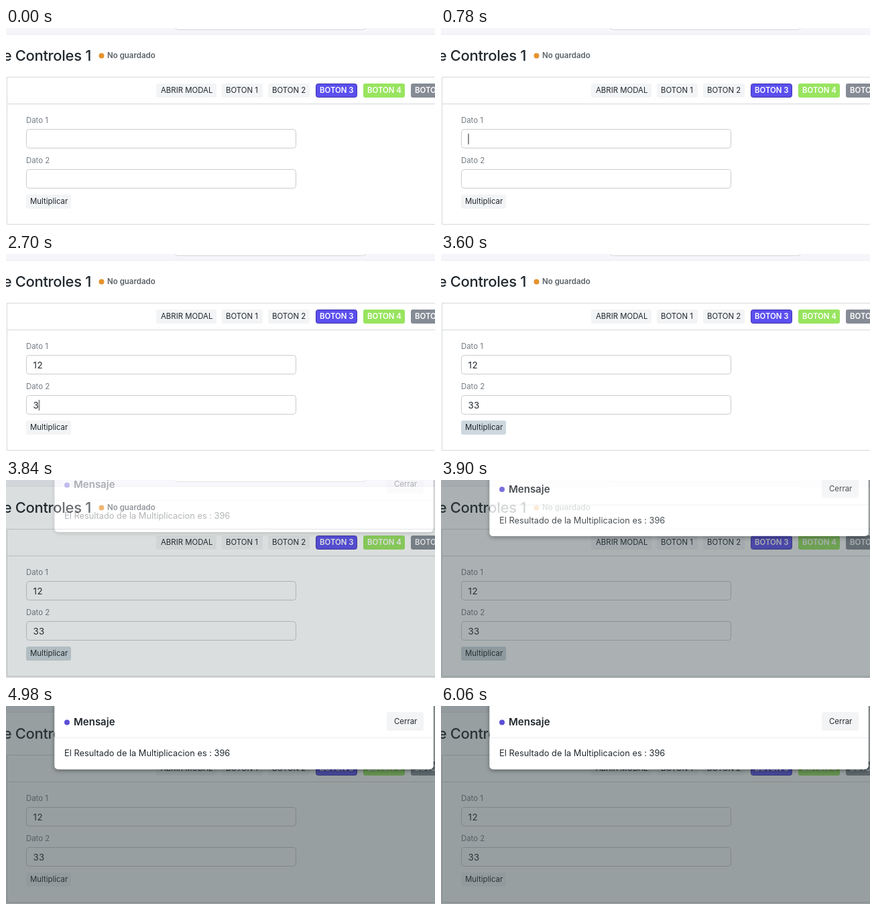
An HTML page that plays this animation: 640 by 296 pixels, repeating every 6.09 s.

```html
<!DOCTYPE html>
<html lang="es">
<head>
<meta charset="utf-8">
<title>Controles</title>
<style>
html, body { margin: 0; width: 100%; height: 100%; overflow: hidden; background: #fff; }
svg { display: block; width: 640px; height: 296px; }
text { font: 400 11.4px Inter, "Open Sans", sans-serif; fill: #20272d; white-space: pre; }
.title { font-size: 22px; font-weight: 500; letter-spacing: -.015em; text-anchor: end; }
.status { font-size: 11.5px; font-weight: 600; fill: #596067; }
.label { fill: #747c84; }
.value { font-size: 13.3px; }
.white { fill: #fff; font-weight: 600; }
.heading { font-size: 15px; font-weight: 600; }
.message { font-size: 12.8px; }
.line { stroke: #d5d8db; fill: none; }
.field { fill: #fff; stroke: #c9ccd0; }
.soft { fill: #f3f4f6; }
.caret { fill: #222; }

/* One loop = 6090 ms; 1% = 60.9 ms */
.anim { animation: 6090ms linear infinite both; }
.step { animation: 6090ms step-end infinite both; }
#caret1 { animation-name: caret1; }
#caret2 { animation-name: caret2; }
#a1 { animation-name: a1; }
#a2 { animation-name: a2; }
#b1 { animation-name: b1; }
#b2 { animation-name: b2; }
#multiply { animation-name: press; }
#backdrop { animation-name: dim; }
#modal { animation-name: fade; }
.slide { animation-name: slide; }

@keyframes a1 { 0% { opacity: 0 } 22.66%, 100% { opacity: 1 } }
@keyframes a2 { 0% { opacity: 0 } 25.62%, 100% { opacity: 1 } }
@keyframes b1 { 0% { opacity: 0 } 44.33%, 100% { opacity: 1 } }
@keyframes b2 { 0% { opacity: 0 } 47.29%, 100% { opacity: 1 } }
@keyframes caret1 {
  0% { opacity: 0; transform: none }
  11.33% { opacity: 1 }
  19.7% { opacity: 0 }
  22.66% { opacity: 1; transform: translateX(6px) }
  25.62% { opacity: 1; transform: translateX(14.5px) }
  36.95%, 100% { opacity: 0 }
}
@keyframes caret2 {
  0% { opacity: 0; transform: none }
  36.95% { opacity: 1; transform: none }
  44.33% { opacity: 1; transform: translateX(8.5px) }
  47.29% { opacity: 1; transform: translateX(17px) }
  55.67%, 100% { opacity: 0 }
}
@keyframes press {
  0% { fill: #f3f4f6 }
  55.67% { fill: #cdd7de }
  68.97%, 100% { fill: #f3f4f6 }
}
/* The dialog opens just before 3800 ms */
@keyframes dim { 0%, 62.35% { opacity: 0 } 64.45%, 100% { opacity: .5 } }
@keyframes fade { 0%, 62.35% { opacity: 0 } 64.45%, 100% { opacity: 1 } }
@keyframes slide {
  0% { transform: translateY(-24.5px) }
  62.07% { transform: translateY(-24.5px); animation-timing-function: ease-out }
  67%, 100% { transform: none }
}
</style>
</head>
<body>
<svg viewBox="0 0 640 296">
  <defs>
    <filter id="shadow" x="-10%" y="-30%" width="120%" height="170%">
      <feDropShadow dx="0" dy="2" stdDeviation="3" flood-color="#000" flood-opacity=".4"/>
    </filter>
    <!-- Keeps the dimming off the area behind the dialog -->
    <mask id="around" maskUnits="userSpaceOnUse" x="0" y="0" width="640" height="296">
      <rect width="640" height="296" fill="#fff"/>
      <rect class="anim slide" x="72.5" y="-20" width="565" height="114.5" rx="5" fill="#000"/>
    </mask>
  </defs>

  <rect width="640" height="296" fill="#fff"/>
  <rect width="640" height="9" fill="#f5f5fa"/>
  <path class="line" d="M0 9.5H640" style="stroke:#ebebf1"/>
  <rect class="field" x="252.5" y="-20.5" width="284" height="23" rx="4" style="stroke:#d3d5da"/>

  <text class="title" x="127" y="49">e Controles 1</text>
  <circle cx="142.5" cy="41.5" r="4" fill="#e5932f"/>
  <text class="status" x="151" y="45">No guardado</text>

  <path class="line" d="M640 73.5H1.5V293.5H640M1.5 113.5H640"/>

  <rect class="soft" x="224" y="83" width="90" height="21" rx="3"/>
  <text x="231" y="97">ABRIR MODAL</text>
  <rect class="soft" x="322" y="83" width="61" height="21" rx="3"/>
  <text x="328" y="97">BOTON 1</text>
  <rect class="soft" x="391" y="83" width="62" height="21" rx="3"/>
  <text x="397" y="97">BOTON 2</text>
  <rect x="462.5" y="83.5" width="61" height="20" rx="3" fill="#5b4fee" stroke="#4136ad"/>
  <text class="white" x="468" y="97">BOTON 3</text>
  <rect x="533" y="83" width="62" height="21" rx="3" fill="#98e45f"/>
  <text class="white" x="539" y="97">BOTON 4</text>
  <rect x="604" y="83" width="62" height="21" rx="3" fill="#868c95"/>
  <text class="white" x="610" y="97">BOTON 5</text>

  <text class="label" x="30" y="142">Dato 1</text>
  <rect class="field" x="30.5" y="151.5" width="402" height="28" rx="4"/>
  <text class="value step" id="a1" x="40.5" y="171">1</text>
  <text class="value step" id="a2" x="46.5" y="171">2</text>
  <rect class="caret step" id="caret1" x="40.5" y="158" width="1" height="16"/>

  <text class="label" x="30" y="202">Dato 2</text>
  <rect class="field" x="30.5" y="211.5" width="402" height="28" rx="4"/>
  <text class="value step" id="b1" x="40.5" y="231">3</text>
  <text class="value step" id="b2" x="49" y="231">3</text>
  <rect class="caret step" id="caret2" x="40.5" y="218" width="1" height="16"/>

  <rect class="step" id="multiply" x="30" y="249" width="67" height="21" rx="3"/>
  <text x="36" y="263">Multiplicar</text>

  <g mask="url(#around)">
    <rect class="anim" id="backdrop" width="640" height="296" fill="#334143"/>
  </g>

  <g class="anim" id="modal">
    <g class="anim slide">
      <rect x="72.5" y="-20" width="565" height="114.5" rx="5" fill="#fff" filter="url(#shadow)"/>
      <circle cx="91" cy="24.5" r="4" fill="#5b50d6"/>
      <text class="heading" x="101" y="29">Mensaje</text>
      <rect class="soft" x="568" y="9" width="55" height="28" rx="4"/>
      <text x="579" y="27">Cerrar</text>
      <path class="line" d="M73 47.5H637" style="stroke:#eceef0"/>
      <text class="message" x="87" y="75">El Resultado de la Multiplicacion es : 396</text>
    </g>
  </g>
</svg>
</body>
</html>
```
